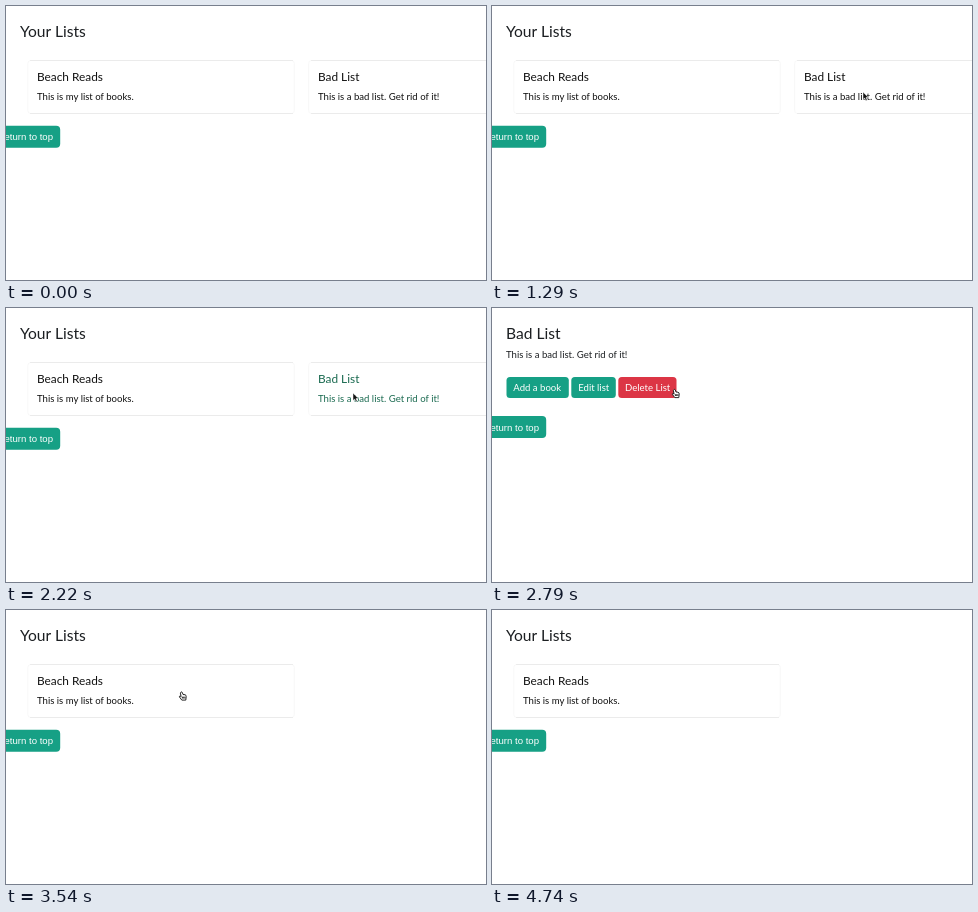
These frames come from a looping animation (480 by 274 pixels, 6.3 s). An HTML page:

```html
<!DOCTYPE html>
<html lang="en">
<head>
<meta charset="utf-8">
<title>Your Lists</title>
<style>
html, body { margin: 0; height: 100%; overflow: hidden; background: #fff; }
svg { display: block; width: 100vw; height: 100vh; }
text { font: 9.58px Lato, "Open Sans", sans-serif; }
.h1 { font-size: 15.6px; fill: #1c1f22; }
.h2 { font-size: 11.85px; }
.card rect { fill: #fff; stroke: #f5f5f5; stroke-width: .7; }
.card path { stroke: #e9e9e9; stroke-width: .8; }
.btn rect { fill: #16a085; }
.btn text { fill: #fff; }
#top text { font: 9.6px "Liberation Sans", Arial, sans-serif; }
</style>
</head>
<body>
<svg viewBox="0 0 480 274">
  <g id="lists">
    <text class="h1" x="14" y="31">Your Lists</text>
    <g class="card" id="beach">
      <rect x="21.8" y="54.5" width="266.5" height="53" rx="3"/>
      <path d="M24 54.5H287M24 107.5H287"/>
      <text class="h2" x="31" y="75.2">Beach Reads</text>
      <text x="31" y="94">This is my list of books.</text>
    </g>
    <g class="card" id="bad">
      <rect x="302.6" y="54.5" width="266.5" height="53" rx="3"/>
      <path d="M305 54.5H480M305 107.5H480"/>
      <text class="h2" x="312" y="75.2">Bad List</text>
      <text x="312" y="94">This is a bad list. Get rid of it!</text>
    </g>
  </g>
  <g id="detail">
    <text class="h1" x="14" y="31">Bad List</text>
    <text x="14" y="50" fill="#1c1f22">This is a bad list. Get rid of it!</text>
    <g class="btn">
      <rect x="14.5" y="69" width="62.3" height="21" rx="3.5"/>
      <text x="21.3" y="83">Add a book</text>
      <rect x="79.3" y="69" width="44.5" height="21" rx="3.5"/>
      <text x="86.2" y="83">Edit list</text>
      <rect id="delete" x="126.3" y="69" width="58.2" height="21" rx="3.5"/>
      <text x="133" y="83">Delete List</text>
    </g>
  </g>
  <g class="btn" id="top">
    <rect x="-17" y="119.7" width="71.2" height="22" rx="4"/>
    <text x="47" y="134.3" text-anchor="end">Return to top</text>
  </g>
  <g id="cursor">
    <path id="arrow" d="M0 0V7.6L1.7 6.1 2.9 8.8 4.2 8.2 3 5.6H5.3Z" fill="#111" stroke="#fff" stroke-width=".5"/>
    <path id="hand" d="M2 .6Q2.8 0 3.3.9L4 3 6 3.2Q7.3 3.6 7.2 5L6.8 8.6H2.8L.4 5.4Q.3 4.4 1.2 4.5L2.1 5.2 1.4 1.6ZM3.4 5.2V7M4.7 5.2V7M5.9 5.2V7" fill="#fff" stroke="#111" stroke-width=".9"/>
  </g>
</svg>
<script>
const LOOP = 6300, OPEN = 2250, DELETED = 3540, GREEN = [26, 106, 80];
// time, x, y of the pointer
const path = [
  [510, 300, 230], [870, 371, 86], [1290, 371, 86], [1920, 347, 85],
  [2250, 347, 85], [2580, 197, 85], [2640, 197, 85], [2790, 180, 81],
  [3150, 173, 81.5], [3600, 173, 81.5], [4080, 344, 114], [4230, 401, 118],
  [4650, 401, 118], [4740, 442, 112]
];
const $ = id => document.getElementById(id);
const show = (id, on) => $(id).style.display = on ? "" : "none";
const ramp = (t, a, b) => Math.min(1, Math.max(0, (t - a) / (b - a)));
const lerp = (a, b, k) => a + (b - a) * k;
const mix = (a, b, k) => `rgb(${a.map((v, i) => Math.round(lerp(v, b[i], k)))})`;
const tint = (id, k) => $(id).setAttribute("fill", mix([17, 17, 17], GREEN, k));

function pointer(t) {
  const i = Math.max(1, path.findIndex(p => p[0] >= t));
  const [a, x0, y0] = path[i - 1], [b, x1, y1] = path[i];
  const k = ramp(t, a, b), e = k * k * (3 - 2 * k);
  return [lerp(x0, x1, e), lerp(y0, y1, e)];
}

function draw() {
  const t = Math.floor(performance.now() % LOOP / 30) * 30;
  const detail = t >= OPEN && t < DELETED;
  show("lists", !detail);
  show("detail", detail);
  show("bad", t < OPEN);
  $("top").setAttribute("transform", `translate(0 ${detail ? -11.7 : 0})`);

  tint("bad", ramp(t, 1320, 1650));
  tint("beach", ramp(t, 3570, 3720) - ramp(t, 3900, 4110));
  $("delete").style.fill = mix([220, 53, 69], [200, 35, 51], ramp(t, 2790, 2940));

  const visible = t >= 510 && t < 4740, hand = t >= 2700 && t < 3660;
  show("cursor", visible);
  if (visible) {
    $("cursor").setAttribute("transform", `translate(${pointer(t)})`);
    show("hand", hand);
    show("arrow", !hand);
  }
  requestAnimationFrame(draw);
}
draw();
</script>
</body>
</html>
```
